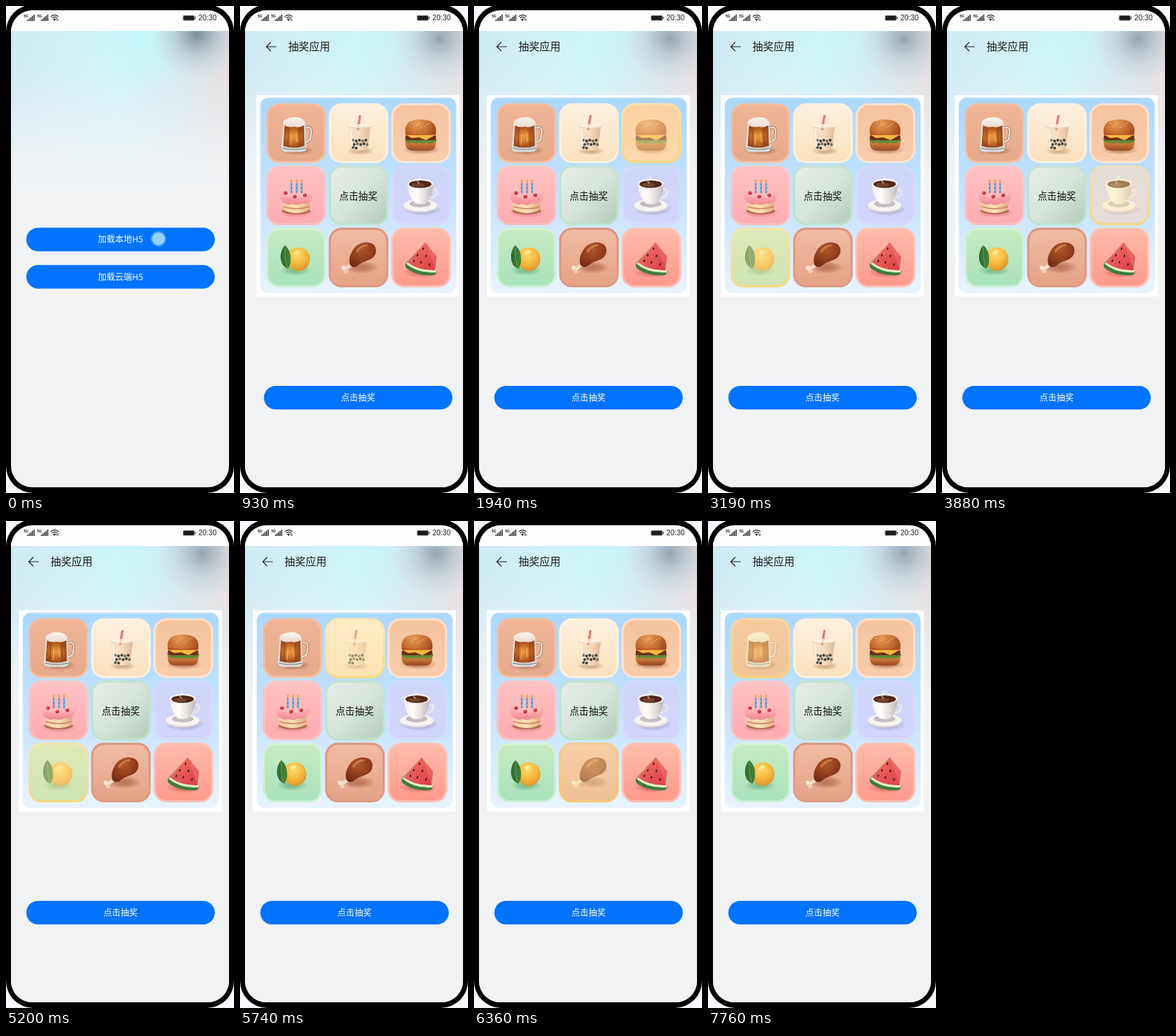
Animation, 320 px wide and 682 px high, one loop 8000 ms. Source, as an HTML page with a canvas:

```html
<!DOCTYPE html>
<html lang="zh">
<head>
<meta charset="utf-8">
<style>
html, body { margin: 0; width: 100%; height: 100%; overflow: hidden; background: #f8f8fd; }
canvas { display: block; width: 320px; height: 682px; }
</style>
</head>
<body>
<canvas id="stage"></canvas>
<script>
const W = 320, H = 682, LOOP = 8000;
const canvas = document.getElementById('stage');
const dpr = window.devicePixelRatio || 1;
canvas.width = W * dpr;
canvas.height = H * dpr;
const c = canvas.getContext('2d');
const CJK = '"Noto Sans CJK SC", "Noto Sans CJK", sans-serif';
const LATIN = '"Liberation Sans", sans-serif';

const clamp = v => Math.max(0, Math.min(1, v));
const easeOut = v => 1 - (1 - v) ** 3;

function addStops(g, cols) {
  cols.forEach((col, i) => g.addColorStop(i / (cols.length - 1), col));
  return g;
}
const grad = (x0, y0, x1, y1, ...cols) => addStops(c.createLinearGradient(x0, y0, x1, y1), cols);
const radial = (x, y, r, ...cols) => addStops(c.createRadialGradient(x, y, 0, x, y, r), cols);

function rr(x, y, w, h, r, fill) {
  c.beginPath();
  c.roundRect(x, y, w, h, r);
  c.fillStyle = fill;
  c.fill();
}
function oval(x, y, rx, ry, fill, rot = 0) {
  c.beginPath();
  c.ellipse(x, y, rx, ry, rot, 0, Math.PI * 2);
  c.fillStyle = fill;
  c.fill();
}
function shape(d, fill) {
  c.fillStyle = fill;
  c.fill(new Path2D(d));
}
function line(d, col, w) {
  c.strokeStyle = col;
  c.lineWidth = w;
  c.lineCap = c.lineJoin = 'round';
  c.stroke(new Path2D(d));
}
function text(s, x, y, size, col, align = 'center', weight = 400, font = CJK) {
  c.font = `${weight} ${size}px ${font}`;
  c.textAlign = align;
  c.textBaseline = 'alphabetic';
  c.fillStyle = col;
  c.fillText(s, x, y);
}
// Soft shadow under an icon.
function shade(x, y, rx, ry, rgb) {
  c.save();
  c.translate(x, y);
  c.scale(1, ry / rx);
  oval(0, 0, rx, rx, radial(0, 0, rx, `rgba(${rgb},.5)`, `rgba(${rgb},.35)`, `rgba(${rgb},0)`));
  c.restore();
}

function backdrop(soft) {
  rr(0, 30, W, 652, 0, '#f0f2f4');
  rr(0, 35, W, 220, 0, grad(7, 0, 313, 0, '#cdeaf5', '#d0f0f8', '#cdf5fa', '#d3eaf0', '#e7dcde'));
  rr(0, 35, W, 220, 0, radial(195, 45, 80, `rgba(190,248,252,${soft ? 0.3 : 0.75})`, 'rgba(190,248,252,0)'));
  c.globalAlpha = soft ? 0.75 : 1;
  rr(200, 35, 113, 110, 0, radial(soft ? 275 : 268, soft ? 46 : 40, 64,
    'rgba(110,133,148,.9)', 'rgba(140,161,174,.75)', 'rgba(170,190,200,.6)',
    'rgba(193,209,216,.45)', 'rgba(208,220,226,0)'));
  c.globalAlpha = 1;
  rr(0, 35, W, 220, 0, grad(0, 35, 0, 255, 'rgba(240,242,244,0)', 'rgba(240,242,244,.1)',
    'rgba(240,242,244,.42)', 'rgba(240,242,244,.82)', '#f0f2f4'));
}

function statusBar() {
  rr(0, 0, W, 35, 0, '#fefefe');
  for (const x of [25, 44]) {
    text('5G', x, 16, 4.6, '#111', 'left', 700, LATIN);
    for (let i = 0; i < 5; i++) {
      const h = 2 + i * 1.75;
      rr(x + 5 + i * 2.2, 21 - h, 1.4, h, 0, '#222');
    }
  }
  line('M63.2 14.6Q68.2 10.6 73.2 14.6M65 16.7Q68.2 14 71.5 16.7M66.6 18.7Q68.2 17.4 69.8 18.7', '#222', 1.2);
  oval(68.2, 20, 0.9, 0.9, '#222');
  line('M71.6 18V20.6M73.2 18V20.6', '#222', 0.7);
  rr(248.3, 13, 16.4, 7.6, 1.6, '#777');
  rr(249.2, 13.9, 14.6, 5.8, 0.8, '#1b1b1b');
  rr(265, 15, 1.2, 3.6, 0.5, '#444');
  text('20:30', 270, 20, 10.3, '#222', 'left', 400, LATIN);
}

function button(y, label) {
  rr(28.5, y, 264.5, 33, 16.5, '#0073ff');
  text(label, 160.7, y + 20.9, 12, '#fff');
}

function touch(x, y, alpha) {
  if (alpha <= 0) return;
  c.globalAlpha = alpha;
  oval(x, y, 11, 11, 'rgba(120,190,255,.45)');
  oval(x, y, 9, 9, '#93d2fb');
  c.globalAlpha = 1;
}

function home(t) {
  button(310.5, '加载本地H5');
  button(362.7, '加载云端H5');
  touch(214, 326, 1 - clamp((t - 80) / 230));
}

function beer() {
  shade(74, 202, 25, 7, '120,55,30');
  line('M85 171L92 170Q95 171 95 176L94 186Q92 190 85 191', '#a86a4a', 3.6);
  line('M85 171L92 170Q95 171 95 176L94 186Q92 190 85 191', '#dfe8e8', 2.2);
  shape('M56 163H86L88 200Q87 204 80 204.5H60Q54 204 53 200Z', '#d3dcdd');
  shape('M57.5 165H84.5L85.5 196Q71 201 55.5 196Z',
    radial(70, 183, 21, '#ec9a45', '#d27a2c', '#a54f1d', '#8d3f17'));
  line('M63 172L62 196M78 172L79 196', 'rgba(120,52,20,.5)', 1.6);
  line('M67 180L66 194M74 178L75 190', 'rgba(255,205,120,.5)', 1.6);
  line('M55 199Q71 203 87 199', '#8d7468', 1.2);
  line('M57 167L54.5 198', 'rgba(255,255,255,.6)', 1.2);
  shape('M56 166Q54 161 59 159Q63 156 70 156Q79 155 84 160Q88 163 85 167Q79 171 71 169Q62 171 56 166Z',
    grad(0, 156, 0, 170, '#f9f4f0', '#ead9cd'));
}

function tea() {
  shade(164, 203, 19, 6, '165,110,60');
  shape('M147 169H178L174 200Q162 205 150.5 200Z', grad(147, 0, 178, 0, '#f5e3cf', '#f7dcc0', '#dfb999'));
  line('M160.5 172L163.5 154.5', '#d9706a', 3.4);
  line('M162 169L164.5 155', '#f1b3a5', 1);
  for (let i = 0; i < 12; i++) {
    const row = Math.floor(i / 5);
    oval(153.5 + (i % 5) * 4.5 + row % 2 * 1.8, 188 + row * 5 + i % 2, 2, 2, i % 3 ? '#45423b' : '#6b6f60');
  }
  c.globalAlpha = 0.75;
  oval(162.5, 168.5, 16.5, 3.2, '#fff3e4');
  c.globalAlpha = 1;
  line('M146 169Q162 174 179 169', '#e5c4a2', 0.9);
  line('M150.5 174L152.5 197', 'rgba(255,255,255,.7)', 1.6);
}

function burger() {
  shade(250, 201, 26, 7, '130,60,25');
  shape('M227 189H270Q271 202 260 202.5H237Q226 202 227 189Z', grad(0, 189, 0, 203, '#d48643', '#bd6a33', '#95481f'));
  shape('M226 186Q248 181 271 186Q272 191 266 191Q262 194 257 191Q252 194 247 191Q242 194 237 191Q228 194 226 186Z', '#5f8c35');
  rr(227, 180, 43, 8, 4, '#6d2d1b');
  shape('M227 180H270L263 184L256 188L246 184L236 185Z', '#f3b93f');
  rr(227, 176, 43, 4.5, 2, '#b93d26');
  shape('M227 178Q225 168 233 162Q240 159 249 159Q260 159 266 164Q271 169 270 178Q248 181 227 178Z',
    radial(244, 164, 27, '#e59a58', '#cc7537', '#a24d20'));
  for (let i = 0; i < 8; i++) oval(236 + i * 3.5, 164 + (i * 5) % 7, 1, 0.6, '#f8d6a0');
}

function cake() {
  shade(74, 289, 26, 7, '190,80,80');
  oval(74, 287, 20, 4.5, '#b1674c');
  shape('M54 268H94L92 286Q74 294 56 286Z', grad(54, 0, 94, 0, '#f5cfa0', '#fbe0b7', '#dda97d'));
  line('M56 281Q74 287 92 281', '#cf8361', 1.4);
  shape('M51 265Q53 256 74 256Q95 256 97 265Q97 273 92 274Q87 278 82 276Q75 281 68 277Q62 280 57 276Q51 274 51 265Z',
    grad(0, 256, 0, 280, '#ffc0c0', '#fba5aa', '#ee858f'));
  oval(74, 263, 19.5, 5.5, '#ffb9bb');
  [[59, 262], [72, 267], [86, 265]].forEach(([x, y]) => {
    oval(x, y, 2.7, 2.5, '#c0353e');
    oval(x - 0.7, y - 0.8, 0.7, 0.6, '#ff9c98');
  });
  [67, 74.5, 81.5].forEach(x => {
    line(`M${x} 249V261`, '#4797cf', 2.4);
    line(`M${x - 0.8} 253L${x + 0.8} 251M${x - 0.8} 259L${x + 0.8} 257`, '#c8eaff', 0.8);
    oval(x, 245.3, 1.3, 2.5, '#f3a045');
  });
}

function coffee() {
  shade(251, 285, 27, 9, '110,110,160');
  oval(248, 280.5, 24, 9, '#d9d4d6');
  oval(248, 279, 23.5, 8.3, '#f6f3f1');
  oval(248, 277, 15, 5, '#c4bdc1');
  line('M265 257Q273 256 271 263Q269 268 260 269', '#ebe6e5', 2.8);
  shape('M230 249Q231 268 241 276Q248 279 256 276Q265 268 266.5 249Z',
    grad(230, 0, 266, 0, '#f3eeea', '#fffdfa', '#e6dfde', '#bfb7ba'));
  oval(248, 249, 18.3, 6.8, '#fcf6f0');
  oval(248, 249.5, 15.8, 5.3, '#4f291b');
  oval(245, 250.5, 9, 2.7, '#75432c');
  line('M246 248Q242 245 246 242T246 238', 'rgba(255,255,255,.5)', 1.6);
}

function lemon() {
  shade(73, 370, 22, 8, '70,145,85');
  shape('M61 354Q62 339 76 338Q87 338 91 346Q95 352 92 361Q88 370 78 371Q64 371 61 354Z',
    radial(75, 348, 25, '#ffdc6c', '#f6bb40', '#dd8d22'));
  oval(75, 345, 4.5, 2.4, 'rgba(255,245,185,.6)', -0.4);
  shape('M58 335Q66 342 66 353Q67 362 62 368Q51 363 52 349Q53 340 58 335Z', grad(52, 0, 67, 0, '#2b6a35', '#47853a'));
  line('M58 338Q57 352 61 366', '#7dab52', 0.8);
}

function chicken() {
  shade(166, 366, 24, 9, '140,60,35');
  line('M152 362L142 369', '#f4dcc5', 5);
  oval(140, 366.5, 3, 2.9, '#f8e5d2');
  oval(143.5, 371.5, 3, 2.9, '#efcfb3');
  shape('M149 362Q147 352 152 344Q158 332 171 331Q185 331 186 342Q186 352 175 356Q165 359 160 364Q153 368 149 362Z',
    radial(166, 340, 29, '#b0582f', '#953f1d', '#6b2713'));
  line('M159 344Q164 336 173 335', 'rgba(239,164,105,.55)', 2.4);
}

function melon() {
  shade(250, 373, 26, 8, '180,65,55');
  shape('M255 331L227 361Q226 366 231 369Q246 379 267 377Q271 376 270 371L271 351Z', '#3f7d3b');
  shape('M255 331L228 361Q245 375 270 373L271 351Z', '#e6ebc4');
  shape('M255 331L230 359Q246 371 269 370L271 351Z', grad(238, 338, 264, 372, '#ee6a60', '#dc4048'));
  shape('M255 331L271 351L269 370L262 350Z', 'rgba(250,140,128,.3)');
  [[252, 340], [244, 349], [256, 350], [239, 357], [249, 359], [261, 362]].forEach(([x, y]) =>
    oval(x, y, 1, 1.8, '#3a1818', 0.4));
}

// Cells row by row: border colours, fill colours, icon.
const cells = [
  ['#f4bb9d', '#f5c1a4', '#efb596', '#e6aa8b', beer],
  ['#fff0da', '#fff1dc', '#fdf0df', '#fbe0bd', tea],
  ['#ffdfc7', '#ffe4d2', '#f6c39e', '#f9ccab', burger],
  ['#ffc8c4', '#ffbdbd', '#fdc2c2', '#ffacb0', cake],
  ['#c5e3cc', '#bce2c7', '#e8efeb', '#b1cbbb', null],
  ['#d5d8fc', '#d8dbff', '#ced5f8', '#d2d5fb', coffee],
  ['#d7f2d2', '#c9f1d4', '#c8ebc2', '#a8e2bb', lemon],
  ['#dd967b', '#df9b82', '#f1bca3', '#e4a286', chicken],
  ['#ffc2b1', '#ffbdb1', '#ffbcaa', '#ff998b', melon]
];
const ring = [0, 1, 2, 5, 8, 7, 6, 3];

const even = (start, end, n) => Array.from({ length: n }, (_, i) => start + (end - start) * (i + 1) / n);
const steps = [
  1630, 1940, 2250, 2640, 2950, 3190, 3420, 3570,
  ...even(3570, 4430, 11), ...even(4430, 5200, 11),
  5350, 5510, 5660, 5820, 6050, 6210, 6360, 6670, 7140, 7600
];

function drawCell(i, lit) {
  const [edgeA, edgeB, fillA, fillB, icon] = cells[i];
  const x = 31.8 + i % 3 * 87.7, y = 136.3 + Math.floor(i / 3) * 87.1, s = 83.6;
  rr(x, y, s, s, 18, grad(0, y, 0, y + s, edgeA, edgeB));
  const fill = icon ? grad(0, y, 0, y + s, fillA, fillB) : grad(x, y, x + s, y + s, fillA, '#d6e4db', fillB);
  rr(x + 3, y + 3, s - 6, s - 6, 15, fill);
  if (icon) icon();
  else text('点击抽奖', 161, 270.8, 13.4, '#111', 'center', 500);
  if (lit) {
    rr(x + 3, y + 3, s - 6, s - 6, 15, 'rgba(255,230,168,.44)');
    c.beginPath();
    c.roundRect(x + 1.5, y + 1.5, s - 3, s - 3, 16.5);
    c.strokeStyle = grad(0, y, 0, y + s, 'rgba(255,226,160,.7)', 'rgba(255,212,108,.85)');
    c.lineWidth = 3;
    c.stroke();
  }
}

function lottery(t) {
  line('M45.5 57H32.2M38 51L32 57L38 63', '#222', 1.2);
  text('抽奖应用', 62.6, 62.1, 14.7, '#1b1b1b', 'left');
  rr(18, 125, 285, 282, 0, '#fff');
  rr(23.5, 128.5, 275, 273.5, 11, grad(0, 128, 0, 402, '#abd8fe', '#c3e2ff', '#e9f3ff'));
  const n = steps.filter(s => s <= t).length;
  const active = n ? ring[n % 8] : -1;
  cells.forEach((_, i) => drawCell(i, i === active));
  button(532, '点击抽奖');
  if (t >= 1400) touch(214, 548, 1 - clamp((t - 1480) / 220));
}

function slide(dx, draw) {
  c.save();
  c.translate(dx, 0);
  draw();
  c.restore();
}

function render(t) {
  c.setTransform(dpr, 0, 0, dpr, 0, 0);
  rr(0, 0, W, H, 0, '#f8f8fd');
  rr(0, -2, W, 684, 38, '#000');
  c.save();
  c.beginPath();
  c.roundRect(7, 6, 306, 668, 30);
  c.clip();
  const p = easeOut(clamp((t - 700) / 310));
  backdrop(false);
  if (p < 1) slide(-80 * p, () => home(t));
  if (p > 0) slide(306 * (1 - p), () => { backdrop(true); lottery(t); });
  statusBar();
  c.restore();
}

function tick() {
  render(performance.now() % LOOP);
  requestAnimationFrame(tick);
}
tick();
</script>
</body>
</html>
```
